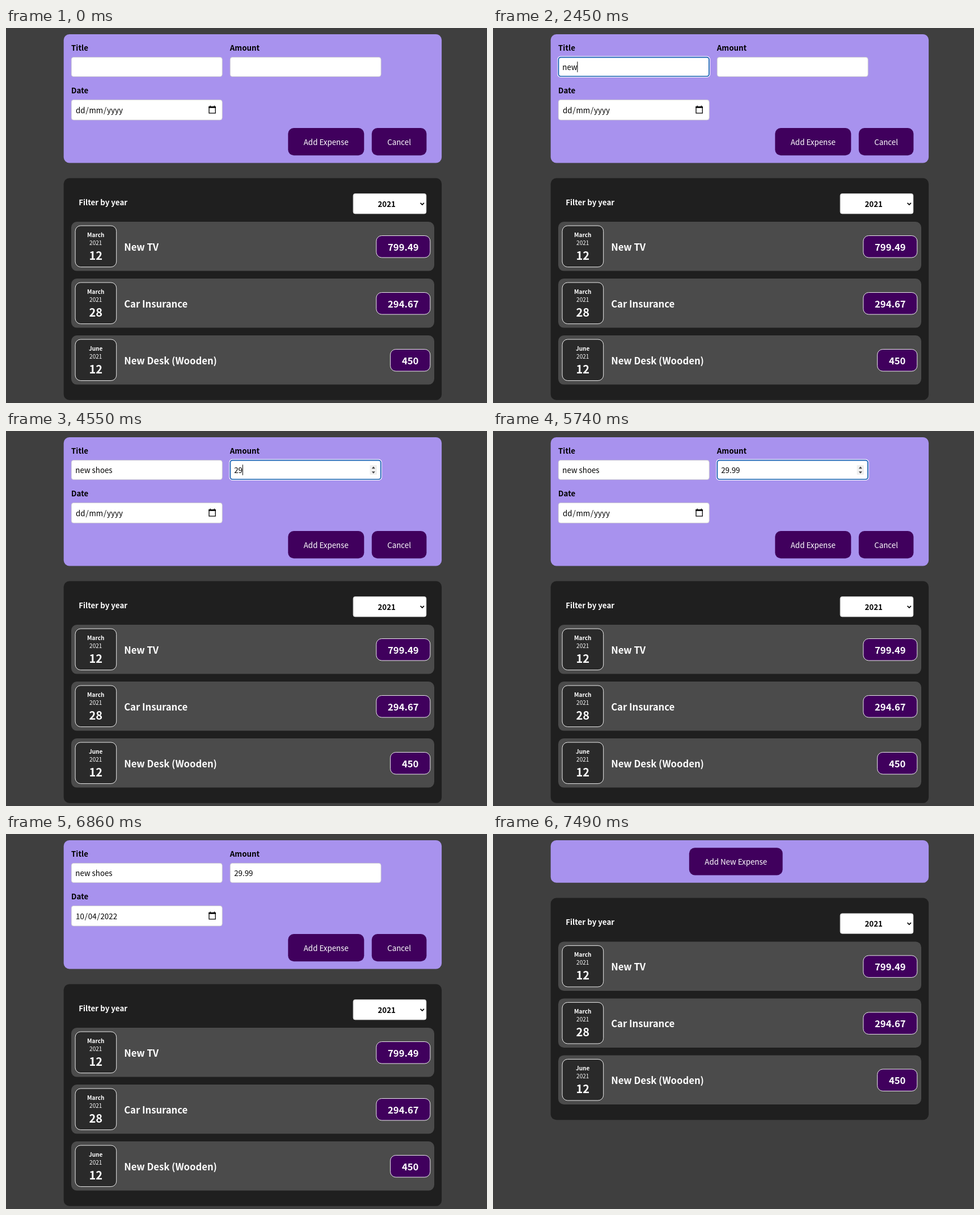
An HTML page that plays this animation: 848 by 660 pixels, repeating every 8000 ms.

```html
<!DOCTYPE html>
<html lang="en">
<head>
<meta charset="utf-8">
<title>Expense form</title>
<style>
  html, body { margin: 0; width: 100%; height: 100%; overflow: hidden; background: #3f3f3f; }
  svg { display: block; width: 848px; height: 660px; }
  text { font-family: "Noto Sans CJK JP", "Noto Sans CJK SC", "Noto Sans CJK", "Noto Sans", sans-serif; font-size: 13.33px; white-space: pre; }
  .bold { font-weight: 700; }
  .mid { text-anchor: middle; }
  .white { fill: #fff; }
  .small { font-size: 10px; }
  .day { font-size: 20px; }
  .large { font-size: 16.67px; }
  .picker text { font-family: "Liberation Sans", Arial, sans-serif; font-size: 10px; }
  .panel { filter: drop-shadow(0 3px 3px rgba(0, 0, 0, .3)); }
</style>
</head>
<body>
<svg id="stage" viewBox="0 0 848 660"></svg>
<script>
const LOOP = 8000, BLINK = 490;
const FOCUS_TITLE = 980, HOVER_AMOUNT = 3500, FOCUS_AMOUNT = 3640, BLUR_AMOUNT = 5880;
const OPEN_PICKER = 6090, PICK_DATE = 6860, HOVER_ADD = 7140, SUBMIT = 7490;
const TITLE = { text: 'new shoes', x: 122.3, keys: [2170, 2310, 2450, 2520, 2660, 2660, 2800, 2940, 3220] };
const AMOUNT = { text: '29.99', x: 402.2, keys: [4340, 4550, 4900, 5110, 5250] };

const rect = (x, y, w, h, r, fill, attrs = '') =>
  `<rect x="${x}" y="${y}" width="${w}" height="${h}" rx="${r}" fill="${fill}" ${attrs}/>`;
const text = (x, y, str, cls = '', attrs = '') =>
  `<text x="${x}" y="${y}" class="${cls}" ${attrs}>${str}</text>`;
const line = (d, width, color = '#000') =>
  `<path d="${d}" fill="none" stroke="${color}" stroke-width="${width}"/>`;
const group = (id, body, attrs = '') => `<g id="${id}" ${attrs}>${body}</g>`;

const field = (x, y, h) => rect(x + .4, y + .4, 265.9, h - .8, 4, '#fff', 'stroke="#ccc" stroke-width=".85"');
const button = (x, y, w, label, id = '') =>
  rect(x, y, w, 48.2, 10, '#40005d', id && `id="${id}"`) + text(x + w / 2, y + 29.8, label, 'mid white');
const ring = (id, x) => group(id,
  rect(x - .8, 50.2, 268.2, 36.2, 5, 'none', 'stroke="#fff" stroke-width="1.2"') +
  rect(x + .6, 51.6, 265.4, 33.4, 4, 'none', 'stroke="#1460b4" stroke-width="1.7"'));

function dateText(id, [day, month, year]) {
  const gap = '<tspan dx=".83">';
  return text(123.1, 150, `${day}${gap}/</tspan>${gap}${month}</tspan>${gap}/</tspan>${gap}${year}</tspan>`, '', `id="${id}"`);
}

function expense(row, month, day, title, price, priceX) {
  const y = 341 + row * 100, outline = 'stroke="#fff" stroke-width=".9"';
  return rect(115, y, 640, 86.6, 10, '#4b4b4b') +
    rect(122.1, y + 7, 72.6, 72.6, 9.6, '#2a2a2a', outline) +
    text(158.2, y + 26.6, month, 'mid white bold small') +
    text(158.2, y + 40.8, '2021', 'mid white small') +
    text(158.2, y + 66.6, day, 'mid white bold day') +
    text(208.2, y + 50.7, title, 'white bold large') +
    rect(priceX, y + 24.5, 747.8 - priceX, 38.5, 9.6, '#40005d', outline) +
    text((priceX + 747.8) / 2, y + 50.7, price, 'mid white bold large');
}

function pickerBody() {
  const colX = i => 135.6 + 23.33 * i;
  let out = rect(114.9, 162.4, 182.2, 234.2, 0, '#fff', 'class="panel"') +
    rect(114.9, 162.4, 182.2, 234.2, 0, 'none', 'stroke="#111" stroke-width="1"') +
    text(124, 185.2, 'April 2022', 'bold') + '<path d="M175 180h6l-3 3.6z"/>' +
    line('M249.3 189V176.6M243.4 182.5l5.9-5.9 5.9 5.9', 1, '#222') +
    line('M275.6 176v12.4M269.7 182.5l5.9 5.9 5.9-5.9', 1, '#222') +
    rect(264.4, 248.4, 22.4, 22, 0, '#0075ff', 'stroke="#0057b8" stroke-width="1"');
  [...'MTWTFSS'].forEach((name, i) => out += text(colX(i), 215.8, name, 'mid'));
  for (let i = 0; i < 42; i++) {
    const n = i - 3, inMonth = n > 0 && n <= 30;
    const label = n < 1 ? n + 31 : inMonth ? n : n - 30;
    const color = n === 10 ? '#fff' : inMonth ? '#000' : '#757575';
    out += text(colX(i % 7), 240 + 23.33 * Math.floor(i / 7), label, n === 10 ? 'mid bold' : 'mid', `fill="${color}"`);
  }
  return out + text(133, 382.6, 'Clear', '', 'fill="#0068d0"') + text(251, 382.6, 'Today', '', 'fill="#0068d0"');
}

const form = rect(101.7, 11, 666.4, 226.4, 10, '#a892ee') +
  text(115, 40, 'Title', 'bold') + text(394.8, 40, 'Amount', 'bold') + text(115, 115.2, 'Date', 'bold') +
  field(114.9, 51, 35) + field(394.8, 51, 35) + field(114.9, 126, 36.3) +
  ring('titleRing', 114.9) + ring('amountRing', 394.8) +
  group('spinner', rect(641.5, 60, 12.5, 17, 1, '#efefef') +
    '<path d="M644.8 66.2h6l-3-3.6zM644.8 71.2h6l-3 3.6z" fill="#444"/>') +
  text(TITLE.x, 74, '', '', 'id="titleText"') + text(AMOUNT.x, 74, '', '', 'id="amountText"') +
  rect(0, 59.2, 1, 18.6, 0, '#000', 'id="caret"') +
  dateText('emptyDate', ['dd', 'mm', 'yyyy']) + dateText('pickedDate', ['10', '04', '2022']) +
  line('M358 138.6h11.2v11.2h-11.2z', 1.3) + line('M357.4 139.4h12.4', 2.6) + line('M360 136.6v2M367.2 136.6v2', 1.4) +
  button(497.3, 176, 134, 'Add Expense', 'addButton') + button(644.8, 176, 96.6, 'Cancel');

const list = rect(101.7, 264.2, 666.4, 390.6, 10, '#1f1f1f') +
  text(128.2, 311.8, 'Filter by year', 'white bold') +
  rect(612.1, 291.5, 128.8, 35.4, 3.5, '#fff', 'stroke="#ccc" stroke-width=".85"') +
  text(671.2, 314.8, '2021', 'mid bold') + line('M730.6 307.8l3.2 3.2 3.2-3.2', 1.7) +
  expense(0, 'March', '12', 'New TV', '799.49', 652.8) +
  expense(1, 'March', '28', 'Car Insurance', '294.67', 652.8) +
  expense(2, 'June', '12', 'New Desk (Wooden)', '450', 677.6);

document.getElementById('stage').innerHTML =
  rect(0, 0, 848, 660, 0, '#3f3f3f') +
  group('openForm', form) +
  group('closedForm', rect(101.7, 11, 666.4, 74.8, 10, '#a892ee') + button(345.8, 24.2, 164.8, 'Add New Expense')) +
  group('list', list) +
  group('picker', pickerBody(), 'class="picker"');

const el = Object.fromEntries([...document.querySelectorAll('[id]')].map(node => [node.id, node]));
const show = (node, on) => node.setAttribute('display', on ? 'inline' : 'none');

function typeInto(node, entry, t) {
  const typed = entry.text.slice(0, entry.keys.filter(k => t >= k).length);
  if (node.textContent !== typed) node.textContent = typed;
}

function placeCaret(node, entry, focusTime, t) {
  const last = Math.max(focusTime, ...entry.keys.filter(k => t >= k));
  const width = node.textContent ? node.getComputedTextLength() : 0;
  el.caret.setAttribute('x', entry.x + width - .2);
  show(el.caret, Math.floor((t - last) / BLINK) % 2 === 0);
}

function update(t) {
  const inTitle = t >= FOCUS_TITLE && t < FOCUS_AMOUNT;
  const inAmount = t >= FOCUS_AMOUNT && t < BLUR_AMOUNT;
  const closed = t >= SUBMIT;
  show(el.openForm, !closed);
  show(el.closedForm, closed);
  el.list.setAttribute('transform', `translate(0 ${closed ? -151.6 : 0})`);
  show(el.titleRing, inTitle);
  show(el.amountRing, inAmount);
  show(el.spinner, t >= HOVER_AMOUNT && t < BLUR_AMOUNT);
  typeInto(el.titleText, TITLE, t);
  typeInto(el.amountText, AMOUNT, t);
  if (inTitle) placeCaret(el.titleText, TITLE, FOCUS_TITLE, t);
  else if (inAmount) placeCaret(el.amountText, AMOUNT, FOCUS_AMOUNT, t);
  else show(el.caret, false);
  show(el.picker, t >= OPEN_PICKER && t < PICK_DATE);
  show(el.emptyDate, t < PICK_DATE);
  show(el.pickedDate, t >= PICK_DATE);
  el.addButton.setAttribute('fill', t >= HOVER_ADD ? '#510674' : '#40005d');
}

let start;
function frame(now) {
  start ??= now;
  update((now - start) % LOOP);
  requestAnimationFrame(frame);
}
update(0);
requestAnimationFrame(frame);
</script>
</body>
</html>
```
